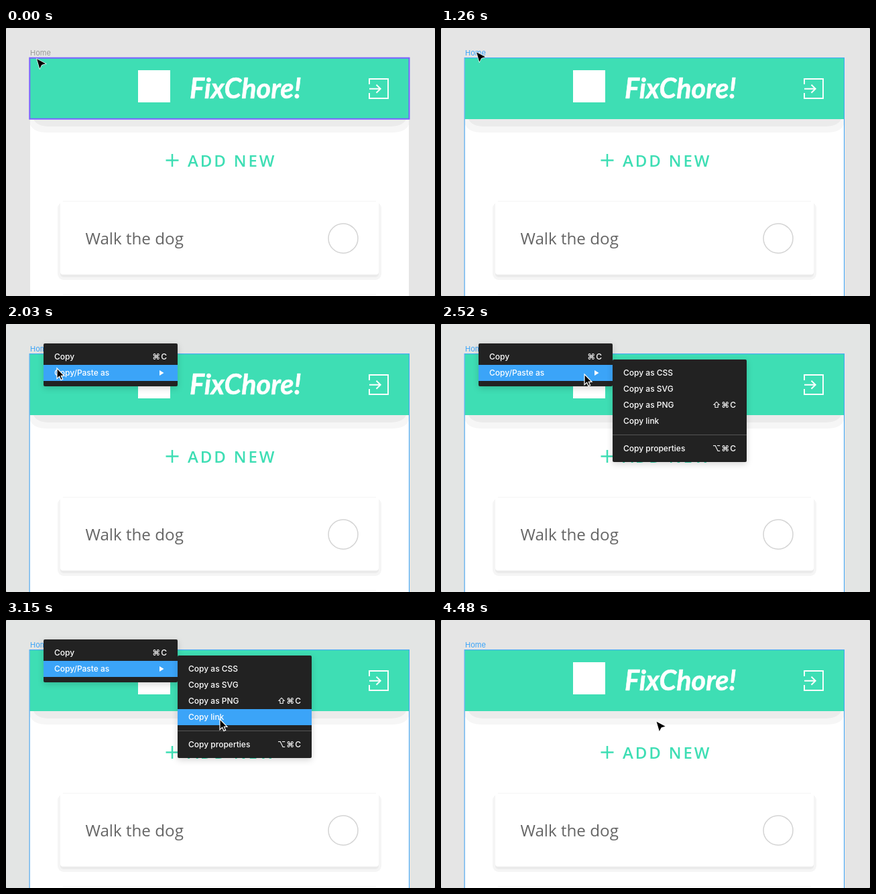
Animation, 640 px wide and 400 px high, one loop 4550 ms. Source, as an HTML page:

```html
<!DOCTYPE html>
<html lang="en">
<head>
<meta charset="utf-8">
<title>Copy link menu</title>
<style>
html, body { margin: 0; width: 100%; height: 100%; overflow: hidden; background: #777; }
svg { display: block; width: 100vw; height: 100vh; }
.ui { font: 500 12px Inter, "DejaVu Sans", sans-serif; fill: #fff; }
.keys { text-anchor: end; letter-spacing: 1px; }
.menu { filter: drop-shadow(0 3px 5px rgba(0, 0, 0, .16)); }
.line { fill: none; stroke: #fff; stroke-width: 1.9; }
</style>
</head>
<body>
<svg viewBox="0 0 640 400">
  <rect id="bg" width="640" height="400" rx="1.5"/>
  <text id="label" x="36" y="41" font-family="Inter, sans-serif" font-size="11">Home</text>

  <rect x="36" y="45" width="565" height="360" fill="#fff"/>
  <path d="M36 136H601V144Q596 156 576 156H61Q41 156 36 144Z" fill="#f6f6f6"/>
  <path d="M41 136H597Q592 147 572 147H65Q46 147 41 136Z" fill="#ebebeb"/>
  <rect x="35.5" y="45" width="566" height="91" fill="#3edeb4"/>
  <rect x="197" y="63" width="48" height="48" fill="#fff"/>
  <text x="274" y="105" font-family="Lato, sans-serif" font-size="41.4" font-weight="700" font-style="italic"
        fill="#fff" stroke="#fff" stroke-width=".6" stroke-linejoin="round">FixChore!</text>
  <path class="line" d="M542 84V76H570V105H542V97M542 90.7H558.5M552.5 84.7L558.7 90.7L552.5 96.7"/>

  <path d="M238.5 197.6H257.5M248 188V207" stroke="#3edeb4" stroke-width="2.5"/>
  <text x="271" y="206.6" font-family="'Open Sans', sans-serif" font-size="24" font-weight="600"
        letter-spacing="2.88" fill="#3edeb4">ADD NEW</text>

  <rect x="77" y="260" width="483" height="116" rx="9" fill="#f5f5f5"/>
  <rect x="81" y="264" width="475" height="108" rx="5" fill="#ebebeb"/>
  <rect x="81" y="259" width="475" height="109" rx="4" fill="#fff"/>
  <path d="M85 258.5H552M85 397.5H552" stroke="#f5f5f5"/>
  <text x="118.5" y="323" font-family="'Open Sans', sans-serif" font-size="24.2" fill="#666">Walk the dog</text>
  <circle cx="503" cy="314" r="22" fill="none" stroke="#d4d4d4" stroke-width="1.5"/>

  <rect id="layer" x="35.3" y="44.7" width="566.2" height="91" fill="none" stroke="#7b61ff" stroke-width="2"/>
  <rect id="frame" fill="none" stroke="#3ba4f8"/>
  <g id="menu" class="ui menu"></g>
  <g id="sub" class="ui menu"></g>
  <g id="ring" fill="none">
    <circle id="dark" stroke="#111" stroke-width="3"/>
    <circle id="light" stroke="#fff" stroke-width="3"/>
  </g>
  <path id="arrow" d="M0 0L4.2 14.2L7.1 8.7L13 6.9Z" stroke="#fff" stroke-width="1.4" paint-order="stroke"/>
  <path id="pointer" d="M0 0V15.6L3.6 12.3L6 17.6L8.6 16.5L6.3 11.3H11Z" stroke="#fff" stroke-width="1.2"/>
</svg>
<script>
const LOOP = 4550, STEP = 70;
const CLICKS = [980, 3920];
const OPEN = 1540, SUB = 2170, CLOSE = 4060;
const BLUE = '#3ba4f8';

// time, x, y of the pointer
const PATH = [
  [0, 43.5, 42.5], [420, 50.5, 32.5], [1470, 50.5, 32.5], [1820, 71, 59],
  [2030, 76, 66], [2100, 76, 66], [2520, 214, 75], [2660, 250, 81],
  [2940, 322, 129], [3150, 319, 148], [LOOP, 319, 148]
];

const $ = id => document.getElementById(id);
const set = (id, attrs) => {
  for (const k in attrs) $(id).setAttribute(k, attrs[k]);
};
const show = (id, on) => set(id, { visibility: on ? 'visible' : 'hidden' });

function buildMenu(id, x, y, h, rows, extra) {
  const items = rows.map(([top, name, keys = '']) =>
    `<text x="${x + 16}" y="${top + 16}">${name}</text>
     <text class="keys" x="${x + 185}" y="${top + 16}">${keys}</text>`);
  $(id).innerHTML = `<rect x="${x}" y="${y}" width="200" height="${h}" rx="2" fill="#222"/>
    <rect id="${id}Hit" x="${x}" width="200" height="24" fill="${BLUE}"/>${items.join('')}${extra}`;
}

const MAIN_ROWS = [[37, 'Copy', '⌘C'], [61, 'Copy/Paste as']];
const SUB_ROWS = [
  [61, 'Copy as CSS'], [85, 'Copy as SVG'], [109, 'Copy as PNG', '⇧⌘C'],
  [133, 'Copy link'], [174, 'Copy properties', '⌥⌘C']
];
buildMenu('menu', 56, 29, 64, MAIN_ROWS, '<path d="M229 69L235.5 73L229 77Z"/>');
buildMenu('sub', 256, 53, 153, SUB_ROWS, '<path d="M256 165.5H456" stroke="#555"/>');

// Hermite curve through PATH that rests where two neighbours agree
function slope(i, k) {
  const a = PATH[i - 1], b = PATH[i], c = PATH[i + 1];
  if (!a || !c || (b[k] - a[k]) * (c[k] - b[k]) <= 0) return 0;
  return (c[k] - a[k]) / (c[0] - a[0]);
}

function pointerAt(t) {
  let i = 0;
  while (t >= PATH[i + 1][0]) i++;
  const a = PATH[i], b = PATH[i + 1], d = b[0] - a[0], u = (t - a[0]) / d;
  const s = u * u * (3 - 2 * u);
  return [1, 2].map(k => a[k] + (b[k] - a[k]) * s +
    d * u * (1 - u) * (slope(i, k) * (1 - u) - slope(i + 1, k) * u));
}

function highlight(id, rows, y, on) {
  const row = rows.find(([top]) => y >= top && y < top + 24);
  show(id, on && row);
  if (row) set(id, { y: row[0] });
}

function draw(t) {
  const [x, y] = pointerAt(t);
  const open = t >= OPEN && t < CLOSE;
  const sub = open && t >= SUB;
  const onLayer = t < 140;
  const selected = t >= CLICKS[0];

  set('bg', { fill: open ? '#e3e5e4' : '#e5e5e5' });
  set('label', { fill: onLayer ? '#999' : BLUE });
  show('layer', onLayer);
  show('frame', !onLayer);
  set('frame', { x: 35.1, y: 44.6, width: 566.4, height: 380, 'stroke-width': selected ? 1 : 2 });

  show('menu', open);
  show('sub', sub);
  const inSub = sub && x >= 256;
  highlight('menuHit', MAIN_ROWS, inSub ? 73 : y, open && x >= 56);
  highlight('subHit', SUB_ROWS, y, inSub);

  // the ring holds while pressed, then spreads for one step
  const click = CLICKS.find((c, i) => t >= c && t < c + STEP * (2 + i));
  show('ring', click !== undefined);
  if (click !== undefined) {
    const held = t < (click === CLICKS[0] ? click + STEP : CLOSE);
    set('ring', { transform: `translate(${x + 1} ${y + 2})`, opacity: held ? 1 : .35 });
    set('dark', { r: held ? 19.5 : 31 });
    set('light', { r: held ? 16.5 : 28 });
  }

  show('arrow', !open);
  show('pointer', open);
  set('arrow', { transform: `translate(${x + 2.6} ${y + 3.8})` });
  set('pointer', { transform: `translate(${x} ${y})` });
}

const start = performance.now();
function tick() {
  const t = (performance.now() - start) % LOOP;
  draw(Math.floor(t / STEP) * STEP);
  requestAnimationFrame(tick);
}
tick();
</script>
</body>
</html>
```
